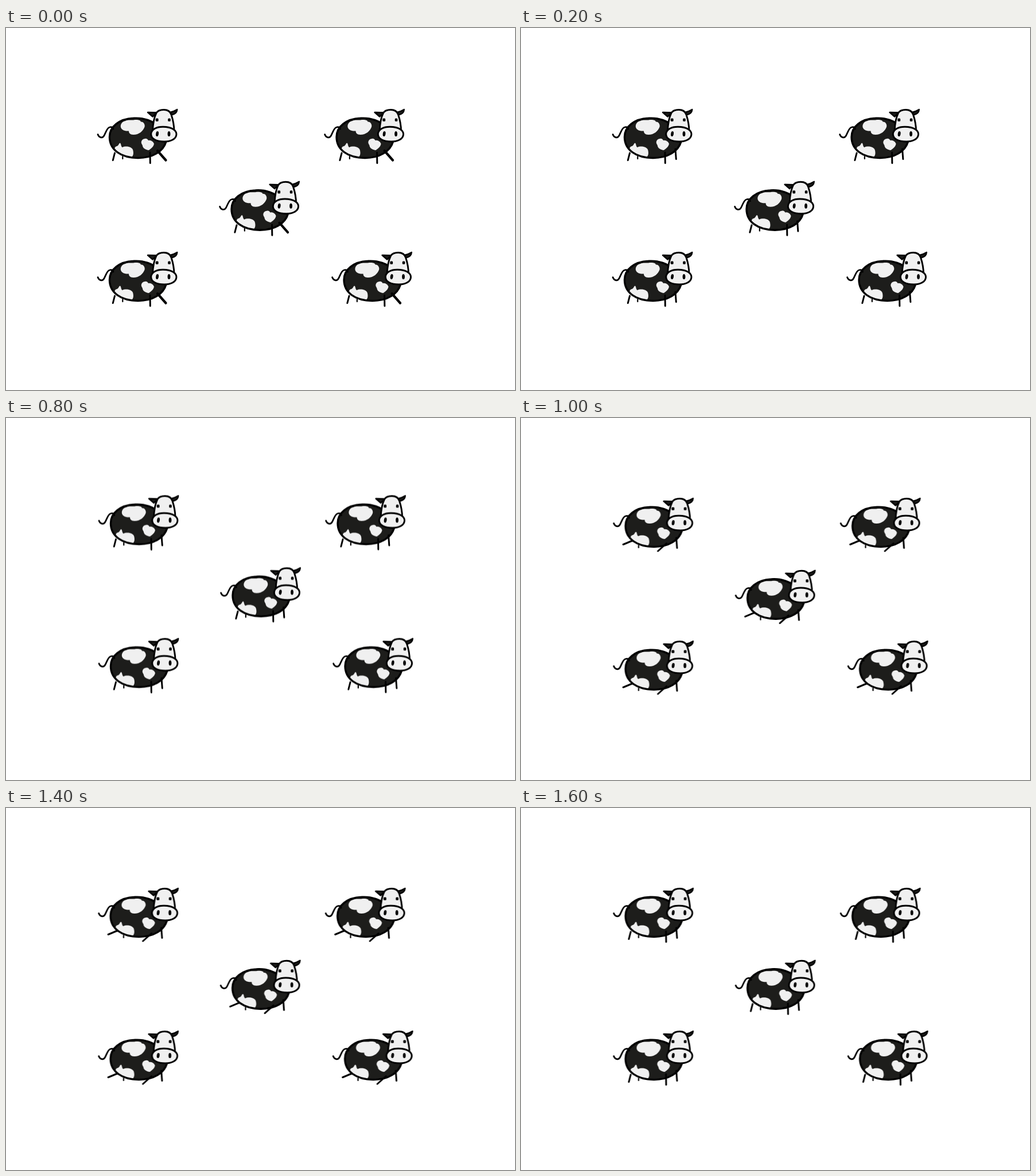
Animation of 887 by 631 pixels, one loop 1.8 s. Source, as an HTML page:

```html
<!DOCTYPE html>
<html lang="en">
<head>
<meta charset="utf-8">
<title>Cows</title>
<style>
html, body { margin: 0; width: 100%; height: 100%; overflow: hidden; background: #fff; }
svg { display: block; }
.herd { animation: hop 1.8s step-end infinite; }
.hide { fill: #1d1d1b; }
.line { fill: none; stroke: #000; stroke-width: 3; stroke-linecap: round; stroke-linejoin: round; }
.pale { fill: #f0f0f0; }
.face { fill: #f0f0f0; stroke: #000; stroke-width: 2.9; stroke-linejoin: round; }
.ear { fill: #1d1d1b; stroke: #000; stroke-width: 2.4; stroke-linejoin: round; }
.front, .kick, .rear, .stride { animation: 1.8s step-end infinite; }
.front { animation-name: front; }
.kick { animation-name: kick; stroke-width: 4.2; }
.rear { animation-name: rear; }
.stride { animation-name: stride; }

@keyframes hop {
  0% { transform: none; }
  44.44% { transform: translate(2px, -6.5px); }
  55.55%, 100% { transform: translate(1.6px, -2px); }
}
@keyframes kick {
  0%, 22.22% { visibility: visible; }
  11.11%, 33.33%, 100% { visibility: hidden; }
}
@keyframes front {
  0%, 22.22% { visibility: hidden; }
  11.11%, 33.33%, 100% { visibility: visible; }
}
@keyframes stride {
  0%, 66.66%, 88.88%, 100% { visibility: hidden; }
  55.55%, 77.77% { visibility: visible; }
}
@keyframes rear {
  0%, 66.66%, 88.88%, 100% { visibility: visible; }
  55.55%, 77.77% { visibility: hidden; }
}
</style>
</head>
<body>
<svg width="887" height="631" viewBox="0 0 887 631">
  <defs>
    <path id="body" d="M180.500 190C180.500 172 197 158.500 222 157.300C240 156 256 162 266 172C274 180 279 189 279 198C274 215 256 226.500 230 226.500C200 226.500 180.500 212 180.500 190Z"/>
  </defs>
  <g class="herd">
    <g id="cow">
      <use href="#body" class="hide"/>
      <g class="pale">
        <path d="M200 173C199 167 203 163 208 162C212 159.500 218 161 222 160.500C228 159.500 234 160 235 163.500C239 162.500 243 168 241.500 172.500C239 179.500 232 186 222 186C216 186 214 183 214 179.500C209 180 202 179 200 173Z"/>
        <path d="M187.500 216C189 210 190 206 193.500 206C197 204 197 200 199 200.500C201 202 200 207 203 208C207 205.500 218 206 221 212C222.500 217 222.500 222 219 225C210 226 196 223 187.500 216Z"/>
        <path d="M236 201C235 197 238 193 242 193C245 192 247 194 248 196C252 194.500 257 198 258 202C257 207 253 210 249 213C243 212.500 238 209 238 205Z"/>
      </g>
      <g class="line">
        <use href="#body" stroke-width="3.4"/>
        <path d="M160 185.500C162 191 168 193 171 187.500C174 182 176 174 180.500 173C184 172 186 173 187 176" stroke-width="2.700"/>
        <path d="M203.300 224V228" stroke-width="2.200"/>
        <path class="rear" d="M189.500 218L186.300 230.500M251 217L251.300 235.500"/>
        <path class="stride" d="M192 216L176.500 222.500M252 220.500L237 234"/>
        <path class="front" d="M269 211L270.300 228.500"/>
        <path class="kick" d="M264 214L278.500 230.500"/>
      </g>
      <path class="ear" d="M247 147L263 147.500L255.500 154.500Z"/>
      <path class="ear" d="M286 147C291 146 295 144 298.300 142C298 147 294 150.500 288.500 151.500Z"/>
      <path class="face" d="M255.500 180C256 168 258 156 262 148C264.500 144 270 142.500 275 142.500C282 142.500 286 145 288 151C291 160 293 169 293 180Z"/>
      <path class="face" d="M252.800 185C253 177 262 172 274 172.300C288 172.500 297 178 297 185C297 193 288 198 276 198C262 198 252.600 193 252.800 185Z"/>
      <rect x="260.800" y="157.600" width="4.800" height="5.200" rx="1.500"/>
      <rect x="282.200" y="157.600" width="4.600" height="5.200" rx="1.500"/>
      <ellipse cx="263.600" cy="184.500" rx="2.400" ry="4.500" transform="rotate(8 263.600 184.500)"/>
      <ellipse cx="284" cy="184.500" rx="2.400" ry="4.500"/>
    </g>
  </g>
</svg>
<script>
const cow = document.getElementById("cow");
for (const [x, y] of [[395.5, 0], [212.5, 125.7], [0, 249], [408.5, 249]]) {
  const twin = cow.cloneNode(true);
  twin.removeAttribute("id");
  twin.setAttribute("transform", `translate(${x} ${y})`);
  cow.parentNode.append(twin);
}
</script>
</body>
</html>
```
